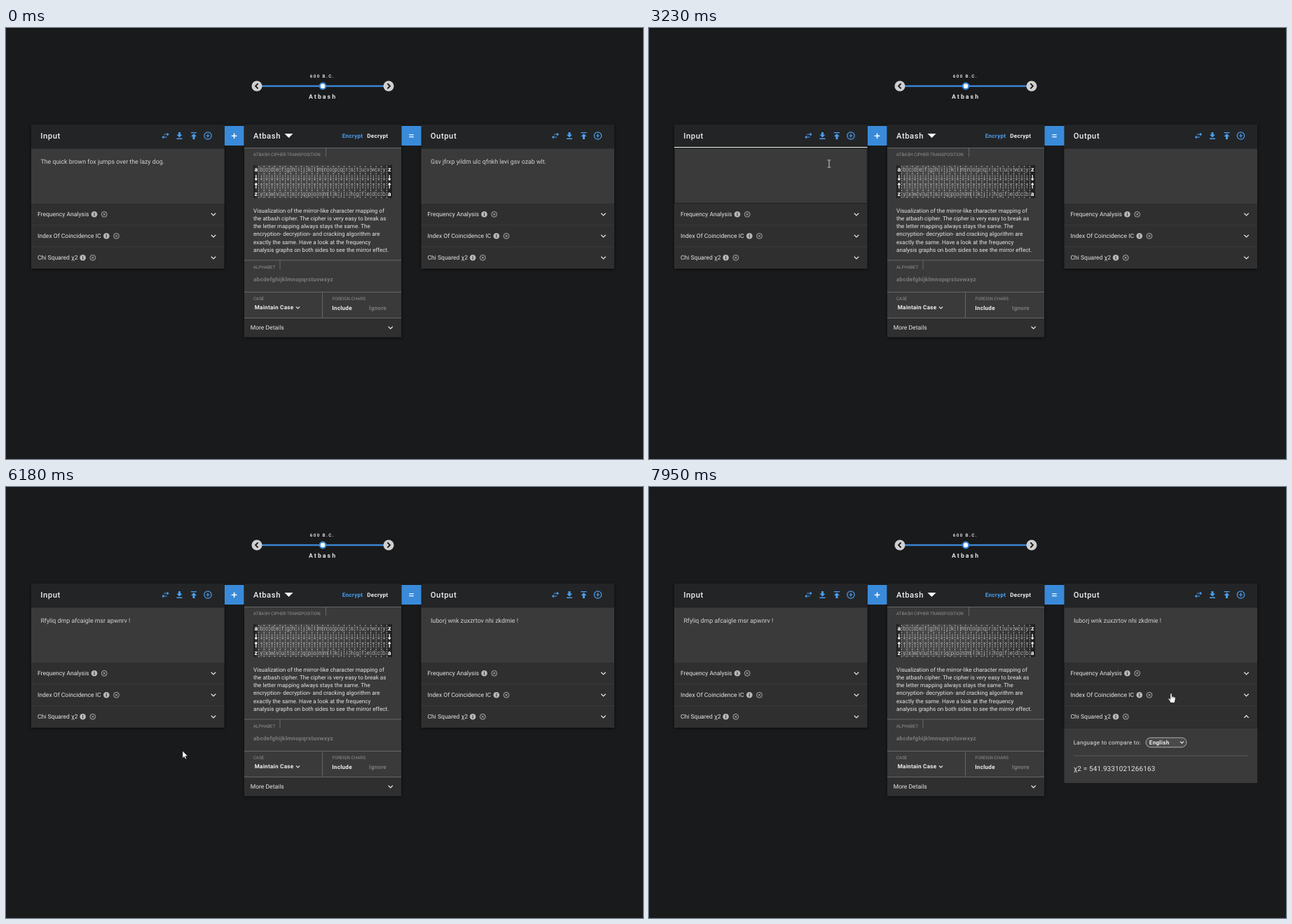
Recreate the animation shown at these times as an HTML page. Size 909 by 616 pixels, loop 8000 ms.

```html
<!DOCTYPE html>
<html lang="en">
<head>
<meta charset="utf-8">
<title>Atbash cipher</title>
<style>
  html, body { margin: 0; height: 100%; overflow: hidden; background: #191a1c; }
  svg { display: block; width: 100%; height: 100%; }
  text { font-family: Roboto, Arial, sans-serif; font-size: 8.55px; fill: #e6e6e6; text-rendering: geometricPrecision; }
  .title { font-size: 11.25px; font-weight: 500; letter-spacing: .55px; fill: #efefef; }
  .body { font-size: 8.84px; fill: #d2d2d2; }
  .note { font-size: 8.12px; }
  .label { font-size: 6.25px; fill: #929292; }
  .strong { font-size: 8.125px; font-weight: 700; letter-spacing: .27px; fill: #f0f0f0; }
  .spaced { font-size: 8.125px; letter-spacing: .27px; }
  .value { font-size: 10px; letter-spacing: .12px; }
  .era { font-size: 6.25px; font-weight: 700; letter-spacing: 1.4px; fill: #ddd; }
  .name { font-size: 8.75px; font-weight: 700; letter-spacing: 2.05px; }
  .cell { font-size: 8.75px; text-anchor: middle; fill: #b0b0b0; }
  .cell.edge { font-weight: 700; fill: #fff; }
  .blue { fill: #4a9ff0; }
  .dim { fill: #7b7b7b; }
  .panel { filter: drop-shadow(0 1px 2px #0009); }
  .line { fill: none; stroke: #e6e6e6; stroke-width: 1.25; }
</style>
</head>
<body>
<svg id="stage" viewBox="0 0 909 616"></svg>
<script>
const rect = (x, y, w, h, fill, more = '') =>
  `<rect x="${x}" y="${y}" width="${w}" height="${h}" fill="${fill}" ${more}/>`;
const text = (x, y, s, cls = '', more = '') =>
  `<text x="${x}" y="${y}" class="${cls}" ${more}>${s}</text>`;
const path = (d, more = '') => `<path class="line" d="${d}" ${more}/>`;
const circle = (x, y, r, fill, more = '') =>
  `<circle cx="${x}" cy="${y}" r="${r}" fill="${fill}" ${more}/>`;
const at = (x, y, s, more = '') => `<g transform="translate(${x} ${y})" ${more}>${s}</g>`;
const style = (color, width) => `style="stroke:${color};stroke-width:${width}"`;
const chevron = (x, y, id = '', s = 1) =>
  at(x, y, path(`M${-3.2 * s} ${-1.6 * s}L0 ${1.6 * s}L${3.2 * s} ${-1.6 * s}`, id && `id="${id}"`));

const info = circle(0, 0, 4.3, '#b9b9b9') + rect(-.6, -.8, 1.2, 3, '#2d2d2d') + rect(-.6, -2.5, 1.2, 1.1, '#2d2d2d');
const close = circle(0, 0, 3.9, 'none', style('#b9b9b9', .9)) +
  path('M-1.5-1.5L1.5 1.5M1.5-1.5L-1.5 1.5', style('#c4c4c4', .9));

function tools() {
  const ink = style('#4a9ff0', 1.2);
  const solid = 'style="fill:#4a9ff0;stroke:none"';
  return at(191.5, 16, path('M-2-2H3M2 2H-3', ink) +
      path('M2.3-4.4L5.2-2L2.3 .4ZM-2.3-.4L-5.2 2L-2.3 4.4Z', solid)) +
    at(211.5, 16, path('M-1.5-5H1.5V-1.6H4L0 2.4L-4-1.6H-1.5ZM-4 3.6H4V5H-4Z', solid)) +
    at(232, 16, path('M-1.5 5H1.5V1H4L0-3L-4 1H-1.5ZM-4-5H4V-3.7H-4Z', solid)) +
    at(252, 16, circle(0, 0, 5.2, 'none', ink) + path('M-2.7 0H2.7M0-2.7V2.7', ink));
}

const rows = [['Frequency Analysis', 90], ['Index Of Coincidence IC', 107.3], ['Chi Squared χ2', 73.6]];
function sidePanel(x, title, id) {
  const base = rect(0, 0, 275.5, 206, '#2f2f2f') + rect(0, 0, 275.5, 34, '#232426') +
    rect(0, 34, 275.5, 1, '#2d2d2e') + rect(0, 35, 275.5, 78, '#3a3a3a');
  const items = rows.map(([name, iconX], i) => {
    const y = 128.3 + 31 * i;
    return (i ? rect(0, y - 16, 275.5, 1, '#3b3b3b') : '') + text(9, y + 3, name) +
      at(iconX, y, info) + at(iconX + 14.2, y, close) + chevron(260, y, id + 'Arrow' + i);
  }).join('');
  return at(x, 138, `<g class="panel">${base}</g>` + text(13.3, 19.6, title, 'title') + tools() +
    text(13.4, 56.2, '', 'body', `id="${id}"`) + items);
}

function cipherTable() {
  const step = 198 / 26, letters = 'abcdefghijklmnopqrstuvwxyz';
  let s = rect(353, 196, 198, 47, 'url(#shade)');
  for (let i = 0; i < 26; i++) {
    const x = 353 + step * (i + .5), edge = i % 25 == 0, cls = edge ? 'cell edge' : 'cell';
    const ink = style(edge ? '#fff' : '#a8a8a8', edge ? 1.2 : .8);
    s += text(x, 205, letters[i], cls) + text(x, 239.6, letters[25 - i], cls) +
      path(`M${x} 210V217.4m-1.7-2l1.7 2l1.7-2M${x} 229.5V222m-1.7 2l1.7-2l1.7 2`, ink);
    if (i) s += path(`M${353 + step * i} 197V243`, 'stroke-dasharray="2 1.4" ' + style('#d0d0d0', .8));
  }
  return s;
}

const note = ['Visualization of the mirror-like character mapping of',
  'the atbash cipher. The cipher is very easy to break as',
  'the letter mapping always stays the same. The',
  'encryption- decryption- and cracking algorithm are',
  'exactly the same. Have a look at the frequency',
  'analysis graphs on both sides to see the mirror effect.'];

function centerPanel() {
  const rule = (x, y, w, h) => rect(x, y, w, h, '#666');
  return '<g class="panel">' + rect(340, 138, 224, 303.5, '#3a3a3a') + '</g>' +
    rect(340, 138, 224, 33, '#232426') + rect(340, 415, 224, 26.5, '#2f2f2f') +
    text(353, 157.6, 'Atbash', 'title') + '<path d="M397.5 151H409.5L403.5 157Z" fill="#fff"/>' +
    text(479.7, 157, 'Encrypt', 'strong blue') + text(515.2, 157, 'Decrypt', 'strong') +
    rule(340, 171, 224, 1) + rule(456, 172, 1, 12) +
    text(353, 183.3, 'ATBASH CIPHER TRANSPOSITION', 'label') + cipherTable() +
    note.map((s, i) => text(353, 263.8 + 11.2 * i, s, 'note')).join('') +
    rule(340, 331.5, 224, 1) + rule(390.5, 332, 1, 13) + text(353, 344.3, 'ALPHABET', 'label') +
    text(353, 361.7, 'abcdefghijklmnopqrstuvwxyz', 'strong dim') +
    rule(340, 377, 224, 1) + rule(451, 377, 1, 37) + rule(340, 414, 224, 1) +
    text(353, 389.3, 'CASE', 'label') + text(354.7, 402.4, 'Maintain Case', 'strong') +
    chevron(416.5, 399.7, '', .8) + text(465.5, 389.3, 'FOREIGN CHARS', 'label') +
    text(465.2, 403, 'Include', 'strong') + text(518, 403, 'Ignore', 'strong dim') +
    text(348.7, 431, 'More Details') + chevron(548.7, 428.2);
}

function timeline() {
  const button = (x, dir) => circle(x, 83, 7.5, '#cfcfcf') +
    path(`M${x - 1.6 * dir} 79.4L${x + 1.9 * dir} 83L${x - 1.6 * dir} 86.6`, style('#1b1b1b', 1.9));
  return text(433.7, 71.2, '600 B.C.', 'era') + rect(358, 81.8, 188, 2.4, '#3a87d6') +
    button(358, -1) + button(546, 1) +
    circle(452, 83, 4.3, '#fff', style('#3a87d6', 2.2)) + text(432, 100.7, 'Atbash', 'name');
}

const details = `<g clip-path="url(#fold)">` + rect(592.5, 344, 275.5, 79, '#3a3a3a') +
  rect(592.5, 344, 275.5, 1, '#2a2a2a') + text(605.7, 367.6, 'Language to compare to:', 'spaced') +
  rect(709, 358.3, 58, 13.6, '#4a4a4a', 'rx="6.8" ' + style('#b0b0b0', 1)) +
  text(713.8, 367.9, 'English', 'strong') + chevron(760.5, 365, '', .75) +
  rect(606, 383.5, 249, 1, '#585858') + text(605.7, 406, 'χ2 = 541.9331021266163', 'value') + '</g>';

const pointer = `<g id="pointer">
  <g id="arrow"><path d="M0 0V10.6L2.4 8.4L4 12L5.8 11.2L4.2 7.8H7.6Z" fill="#fff" stroke="#111" stroke-width=".7"/></g>
  <g id="beam">${path('M-2.2-5.2H-.5L0-4.7L.5-5.2H2.2M0-4.7V4.7M-2.2 5.2H-.5L0 4.7L.5 5.2H2.2', style('#d0d0d0', 1))}</g>
  <g id="hand"><path d="M-1.2 1.1Q0-.6 1.2 1.1V5L2.6 4.8L4 5.3L5.3 5.7Q6.6 6.1 6.4 7.6L5.6 11.4L5 14H-.8L-1.5 12L-4.1 8.6Q-4.2 7-2.8 7.4L-1.2 9Z" fill="#fff" stroke="#111" stroke-width=".7"/>
  ${path('M1.2 5V7.5M3 5V7.6M4.7 5.6V7.8', style('#444', .5))}</g></g>`;

document.getElementById('stage').innerHTML = `<defs>
  <linearGradient id="shade"><stop offset="0" stop-color="#1e1e1e"/><stop offset=".06" stop-color="#4a4a4a"/>
  <stop offset=".5" stop-color="#454545"/><stop offset=".92" stop-color="#343434"/><stop offset="1" stop-color="#1e1e1e"/></linearGradient>
  <clipPath id="fold"><rect id="foldBox" x="592" y="344" width="277" height="0"/></clipPath></defs>` +
  rect(0, 0, 909, 2, '#141517') + timeline() + sidePanel(36, 'Input', 'plain') + sidePanel(592.5, 'Output', 'coded') +
  centerPanel() + rect(312, 140, 27.5, 28, '#3a8ada') + rect(564.5, 140, 28, 28, '#3a8ada') +
  path('M321.8 154.2H329.4M325.6 150.4V158', style('#fff', 1.5)) +
  path('M575.3 152.7H581.7M575.3 155.7H581.7', style('#fff', 1.3)) + details +
  `<g id="focus">${rect(36, 170, 275.5, 1.2, '#e8e8e8')}${rect(36.5, 172, 274.5, 78.5, 'none', style('#202020', 1))}</g>` +
  rect(0, 185, 1, 12, '#e6e6e6', 'id="caret"') + circle(0, 0, 7.4, '#a59d1d', 'id="click"') + pointer;

const el = id => document.getElementById(id);
const show = (id, on) => el(id).style.display = on ? '' : 'none';
const within = (t, ...spans) => spans.some(([a, b]) => t >= a && t < b);
const atbash = s => s.replace(/[a-z]/gi, c => {
  const base = c < 'a' ? 65 : 97;
  return String.fromCharCode(2 * base + 25 - c.charCodeAt(0));
});

// Standard material curve: cubic-bezier(.4, 0, .2, 1)
function ease(p) {
  if (p <= 0 || p >= 1) return p <= 0 ? 0 : 1;
  let lo = 0, hi = 1, s;
  for (let i = 0; i < 20; i++) {
    s = (lo + hi) / 2;
    const x = 1.2 * s * (1 - s) ** 2 + .6 * s * s * (1 - s) + s ** 3;
    if (x < p) lo = s; else hi = s;
  }
  return s * s * (3 - 2 * s);
}

// time, x, y
const route = [[600, 760, 606], [830, 480, 480], [1060, 240, 345], [1200, 202, 270], [1370, 257, 207],
  [1430, 257, 200], [1520, 257, 194], [4860, 257, 194], [4940, 257, 225], [5100, 254, 345], [5180, 252, 377],
  [6180, 252, 377], [6290, 242, 382], [6420, 300, 376], [6640, 520, 340], [6830, 690, 302], [6950, 732, 295],
  [7020, 736, 306], [7100, 738, 314.5], [7250, 740, 317.5], [7640, 740, 317.5], [7790, 744, 299], [7950, 745, 294.5]];

function position(t) {
  const i = route.findIndex(k => k[0] > t);
  if (i < 0) return route[route.length - 1].slice(1);
  if (!i) return route[0].slice(1);
  const [a, b] = [route[i - 1], route[i]], p = (t - a[0]) / (b[0] - a[0]);
  return [1, 2].map(k => a[k] + (b[k] - a[k]) * p);
}

function draw(t) {
  const message = t < 2680 ? 'The quick brown fox jumps over the lazy dog.' :
    t < 4020 ? '' : 'Rfyliq dmp afcaigle msr apwnrv !';
  el('plain').textContent = message;
  el('coded').textContent = atbash(message);
  show('focus', within(t, [2560, 5490]));
  show('caret', within(t, [2680, 3230], [3790, 4570], [5130, 5490]));
  el('caret').setAttribute('x', t < 4020 ? 49 : 177);

  const [x, y] = position(t);
  const kind = x < 312 && y < 251 ? 'beam' : y < 344 && (x < 312 || x > 592) ? 'hand' : 'arrow';
  show('pointer', t >= 600);
  for (const k of ['arrow', 'beam', 'hand']) show(k, k == kind);
  el('pointer').setAttribute('transform', `translate(${x} ${y})`);
  show('click', within(t, [2450, 2620], [5490, 5560], [7390, 7470]));
  el('click').setAttribute('transform', `translate(${x - .8} ${y - .8})`);

  el('foldBox').setAttribute('height', 79 * ease((t - 7476) / 300));
  el('codedArrow2').setAttribute('transform', `rotate(${180 * ease((t - 7476) / 150)})`);
}

function tick(now) {
  draw(now % 8000);
  requestAnimationFrame(tick);
}
draw(0);
requestAnimationFrame(tick);
</script>
</body>
</html>
```
